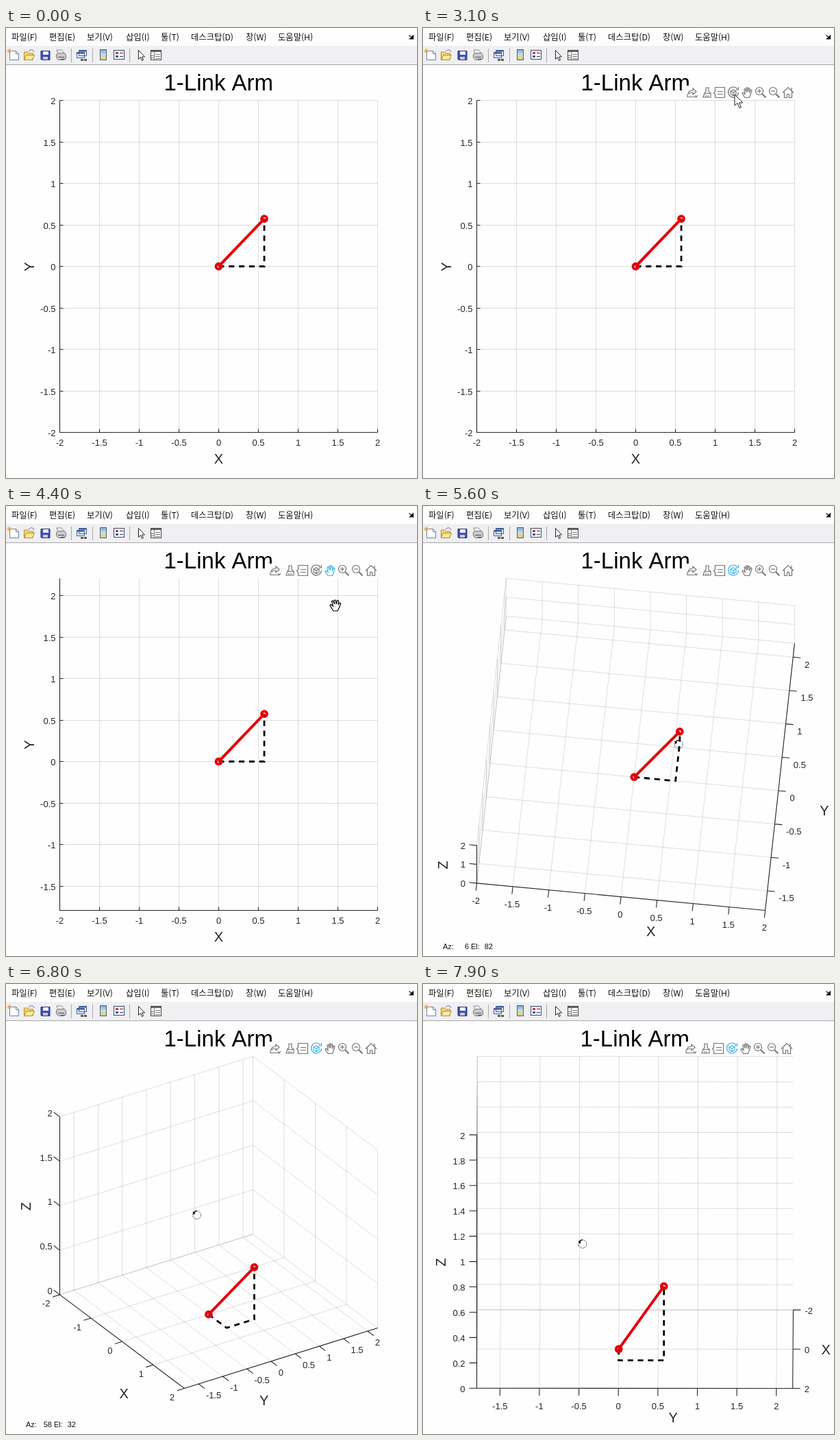
These frames come from a looping animation (600x656 px, 8 s). An HTML page:

```html
<!DOCTYPE html>
<html lang="ko">
<head>
<meta charset="utf-8">
<title>1-Link Arm</title>
<style>
html, body { margin: 0; width: 100%; height: 100%; overflow: hidden; background: #fff; }
svg { display: block; }
text { font-family: "Liberation Sans", Arial, sans-serif; font-kerning: none; }
.menu text { font: 12.3px "Noto Sans CJK KR", "Noto Sans CJK", sans-serif; fill: #111; }
.num { font-size: 13px; fill: #262626; }
.name { font-size: 20px; fill: #262626; text-anchor: middle; }
.info { font-size: 11px; fill: #111; }
.line { fill: none; stroke-linecap: butt; }
</style>
</head>
<body>
<svg width="600" height="656" viewBox="0 0 600 656">
  <rect width="600" height="656" fill="#fefefe"/>
  <g class="menu" id="menu"></g>
  <rect y="26" width="600" height="28" fill="#f0eff1"/>
  <path d="M0 53.5H600" stroke="#a6a6a8"/>
  <path d="M588.5 10.500l5 4.500M594.500 11v5h-5z" stroke="#111" stroke-width="1.200" fill="#111"/>
  <g stroke-width="1" fill="none">
    <path d="M95.500 30V50M126.500 30V50M180.500 30V50" stroke="#a8a8ac"/>
    <path d="M5.500 33.500h9l4 4v9h-13z" fill="#fff" stroke="#6b83aa"/>
    <path d="M14.500 33.500v4h4" stroke="#6b83aa"/>
    <path d="M5 30v7M1.500 33.500h7M2.500 31l5 5M7.500 31l-5 5" stroke="#e8922e"/>
    <path d="M26.500 46V35h5l2 2h6v9z" fill="#f7d774" stroke="#b58a24"/>
    <path d="M26.500 46.500l3-7h12l-3 7z" fill="#ffe79a" stroke="#b58a24"/>
    <path d="M33 34q4-4 7-1l1 2" stroke="#5a77a8"/>
    <path d="M51 33.500h13v13h-12l-1-1z" fill="#3d4fb5" stroke="#26327f"/>
    <path d="M54 34h8v5h-8z" fill="#eef1ff"/>
    <path d="M54 42h7v4h-7z" fill="#c8cada"/>
    <path d="M76 38l-2-6h7l5 6" fill="#fff" stroke="#888"/>
    <path d="M73.500 38.500l3-2h9l2 3v5l-3 2h-8l-3-3z" fill="#c9c9ce" stroke="#77777c"/>
    <path d="M76 42.500h9M80 45.500h6" stroke="#55555a"/>
    <path d="M106.500 32.500h11v8h-11zM103.500 35.500h11v8h-11z" fill="#e9efff" stroke="#3c5a98"/>
    <path d="M104 36.500h10M107 33.500h10" stroke="#3c5a98" stroke-width="2"/>
    <path d="M109 46.500h4m1 0h4" stroke="#444" stroke-width="2.500"/>
    <rect x="137.500" y="31.500" width="9" height="15" fill="url(#heat)" stroke="#4a5d84"/>
    <rect x="157.500" y="32.500" width="15" height="13" fill="#fff" stroke="#34466e"/>
    <path d="M160 36.500h4" stroke="#d33" stroke-width="3"/>
    <path d="M160 41.500h4" stroke="#35c" stroke-width="3"/>
    <path d="M166 36.500h5M166 41.500h5" stroke="#333"/>
    <path d="M193.500 32.500v13l3-3 2 5 2-1-2-4.500h4z" fill="#fff" stroke="#222"/>
    <rect x="211.500" y="32.500" width="15" height="14" fill="#fff" stroke="#444"/>
    <path d="M212 34h14" stroke="#666" stroke-width="2"/>
    <path d="M212 40.500h4M212 43.500h4M218 38.500h7M218 41.500h7M218 44.500h7M216.500 35v11" stroke="#777"/>
  </g>
  <defs>
    <linearGradient id="heat" x2="0" y2="1">
      <stop stop-color="#7aa7e8"/><stop offset=".5" stop-color="#c6e3cf"/><stop offset="1" stop-color="#f2c86a"/>
    </linearGradient>
  </defs>
  <text id="title" y="91" font-size="33" fill="#000">1-Link Arm</text>
  <path id="grid" class="line" stroke="#262626" stroke-opacity=".15"/>
  <path id="axes" class="line" stroke="#262626" stroke-width="1.100"/>
  <g id="labels"></g>
  <path id="dash" class="line" stroke="#000" stroke-width="2.800" stroke-dasharray="8 6.800"/>
  <path id="arm" class="line" stroke="#e3000b" stroke-width="4"/>
  <g id="joints" fill="none" stroke="#e3000b" stroke-width="4"><circle r="3.900"/><circle r="3.900"/></g>
  <g id="tools" fill="none" stroke="#747474" stroke-width="1.200">
    <rect x="385" y="84" width="158" height="20" fill="#fefefe" stroke="none"/>
    <path d="M386 96.500v4h14M387 96q1-5 7-5v-3l5 4.500-5 4.500v-3q-4 0-7 2zM397 98l2 2.500 2-2.500"/>
    <path d="M413 87h4v6l3 2v6h-11l2-6 2-2zM411 95.500h9M413 98v3M416 98v3"/>
    <path d="M426.500 86.500h14v15h-14v-5l-2-2 2-2zM430 92.500h8M430 96.500h8"/>
    <g id="spin"><path d="M459 89a7.500 7.500 0 1 0 1.500 5M460.500 86v4h-4"/><path d="M453 90l4 2v4.500l-4 2-4-2v-4.500zM449 92l4 2 4-2M453 94v4.500"/></g>
    <g id="hand"><path d="M470 101.500l-4-6q0-2 2-1l2 2-1-7q1-2 2 0l1 4v-6q1-2 2 0v6l1-5q1-2 2 0l-.5 6 1.500-4q2-1 2 1l-2 6-1.500 4z"/></g>
    <g id="lens"><circle cx="491" cy="92" r="5.500"/><path d="M495 96l5.500 5.500" stroke-width="2"/><path d="M488 92h6"/></g>
    <path d="M491 89v6"/>
    <use href="#lens" x="20"/>
    <path d="M525 94.500l8-8 8 8M527.500 93v8.500h4v-5h3v5h4V93M538 91v-4"/>
  </g>
  <g id="info" class="info"><text x="29" y="646">Az:</text><text x="67" y="646" text-anchor="end"></text><text x="70" y="646">El:</text><text x="102" y="646" text-anchor="end"></text></g>
  <g id="cursors">
    <path d="M0 0v16l4-3.500 3 7 2.500-1-3-6.500h5.500z" fill="#fff" stroke="#222"/>
    <path d="M-3 8l-5-8q0-2 2-1l2.500 2-2-7q1-2 2.500 0l1.500 4-.5-5q1-2 2.500 0l.5 5 1.500-5q1-1.500 2 0l-.5 6 2-3q2 0 1.500 2l-2.500 6-2 4z" fill="#fff" stroke="#000" stroke-width="1.200"/>
    <g fill="none" stroke="#111"><circle r="6" stroke-dasharray="1.300 1.300"/><path d="M-5-2a6 6 0 0 1 5-4" stroke-width="1.500"/><path d="M-6-5l1 5 3-3z" fill="#111" stroke="none"/></g>
  </g>
</svg>
<script>
const LOOP = 8000, LEFT = 78.5, TOP = 105.5, HEIGHT = 484;
const SHOW_TOOLS = 1700, PAN_ON = 3300, SPIN_ON = 4700, DRAG = 5500, RELEASE = 7800;
const REACH = 0.5736, RISE = 0.585;
const CURSOR = [[2000, 568, 190], [2400, 480, 124], [2600, 445, 96], [2900, 445, 96], [3000, 455, 97],
  [3100, 455, 97], [3300, 472, 94], [3600, 481, 120], [4200, 481, 145], [4450, 481, 145], [4700, 453, 95],
  [4800, 453, 95], [5300, 384, 362], [5500, 384, 362], [6100, 320, 275], [7300, 249, 381], [7900, 233, 379]];
const VIEW = [[DRAG, 0, 90], [6100, 34.9, 42], [7300, 73.1, 25], [RELEASE, 90.1, 17.2]];
const PAN = [[3600, 0], [4200, 25]];
const MENU = [[8, '파일(F)'], [63, '편집(E)'], [118, '보기(V)'], [175, '삽입(I)'], [226, '툴(T)'],
  [270, '데스크탑(D)'], [350, '창(W)'], [397, '도움말(H)']];

const $ = id => document.getElementById(id);
const show = (el, on) => { el.style.display = on ? '' : 'none'; };
const rad = deg => deg * Math.PI / 180;
const fix = n => n.toFixed(2);
const seg = (a, b) => `M${fix(a[0])} ${fix(a[1])}L${fix(b[0])} ${fix(b[1])}`;
const poly = pts => 'M' + pts.map(p => `${fix(p[0])} ${fix(p[1])}`).join('L');
const text = (s, x, y, anchor) =>
  `<text class="num" x="${fix(x)}" y="${fix(y)}" text-anchor="${anchor}">${s}</text>`;
const label = (s, x, y) => `<text class="name" x="${fix(x)}" y="${fix(y + 7)}">${s}</text>`;
const upright = (s, x, y) =>
  `<text class="name" transform="translate(${fix(x + 7)} ${fix(y)}) rotate(-90)">${s}</text>`;

$('menu').innerHTML = MENU.map(([x, s]) => `<text x="${x}" y="18">${s}</text>`).join('');

function track(keys, t) {
  if (t <= keys[0][0]) return keys[0].slice(1);
  for (let i = 1; i < keys.length; i++) {
    const a = keys[i - 1], b = keys[i];
    if (t < b[0]) return a.slice(1).map((v, k) => v + (b[k + 1] - v) * (t - a[0]) / (b[0] - a[0]));
  }
  return keys[keys.length - 1].slice(1);
}

function ticks([lo, hi], step) {
  const out = [];
  for (let i = Math.ceil(lo / step - 1e-6); i * step <= hi + 1e-6; i++) out.push(+(i * step).toFixed(1) || 0);
  return out;
}

// Orthographic view of the unit cube, stretched to fill the plot area.
function projector(az, el, width) {
  const c = Math.cos(rad(az)), s = Math.sin(rad(az)), se = Math.sin(rad(el)), ce = Math.cos(rad(el));
  const sx = width / (Math.abs(c) + Math.abs(s));
  const sy = HEIGHT / (Math.abs(s * se) + Math.abs(c * se) + Math.abs(ce));
  return (u, v, w) => {
    u -= 0.5; v -= 0.5; w -= 0.5;
    return [LEFT + width / 2 + sx * (u * c + v * s),
      TOP + HEIGHT / 2 - sy * (-u * s * se + v * c * se + w * ce)];
  };
}

function flatPlot(yLim) {
  let grid = '', axes = `M${LEFT} ${TOP}V589.5H542.5`, labels = label('X', 310.5, 628) + upright('Y', 34, 348);
  for (const v of ticks([-2, 2], 0.5)) {
    const x = LEFT + (v + 2) * 116;
    grid += `M${x} ${TOP}V589.5`;
    axes += `M${x} 589.5v-5`;
    labels += text(v, x, 609, 'middle');
  }
  for (const v of ticks(yLim, 0.5)) {
    const y = Math.floor(589.5 - (v - yLim[0]) * 121) + 0.5;
    grid += `M${LEFT} ${y}H542.5`;
    axes += `M${LEFT} ${y}h5`;
    labels += text(v, 72.5, y + 5.5, 'end');
  }
  return [grid, axes, labels];
}

function solidPlot(P, yLim, flip) {
  const lims = [[-2, 2], yLim, [0, 2]], back = flip ? 0 : 1;
  // For each axis: the fixed corner and the direction of its ticks.
  const spec = [
    { at: [0, flip ? 1 : 0, 0], out: [0, flip ? 1 : -1, 0] },
    { at: [1, 0, 0], out: [1, 0, 0] },
    { at: [flip ? 1 : 0, 0, 0], out: flip ? [0, -1, 0] : [-1, 0, 0] }
  ];
  let grid = '', axes = '', labels = '';
  spec.forEach(({ at, out }, k) => {
    const on = f => at.map((c, i) => i === k ? f : c);
    const a = P(...on(0)), b = P(...on(1)), len = Math.hypot(b[0] - a[0], b[1] - a[1]);
    const end = P(...at.map((c, i) => (i === k ? 0 : c) + out[i]));
    const dl = Math.hypot(end[0] - a[0], end[1] - a[1]) || 1;
    const dx = (end[0] - a[0]) / dl, dy = (end[1] - a[1]) / dl;
    const step = k === 0 ? (len < 140 ? 2 : len < 380 ? 1 : 0.5)
      : k === 1 ? (len < 140 ? 1 : 0.5)
      : len < 50 ? 2 : len < 100 ? 1 : len < 330 ? 0.5 : 0.2;
    axes += seg(a, b);
    const level = dy < 0.05;
    const gap = 2 + 4 * Math.abs(dx) ** 20;
    const side = dx < -0.2 ? -1 : dx > 0.2 ? 1 : 0;
    for (const v of ticks(lims[k], step)) {
      const f = (v - lims[k][0]) / (lims[k][1] - lims[k][0]);
      const p = P(...on(f)), q = [p[0] + dx * 11, p[1] + dy * 11];
      axes += seg(p, q);
      const drop = k === 2 || level ? 1 : 9.5 + 5 * dy ** 6;
      labels += text(v, q[0] + side * gap, q[1] + drop + 4.7, ['end', 'middle', 'start'][side + 1]);
      if (k === 0) grid += seg(P(f, 0, 0), P(f, 1, 0)) + seg(P(f, back, 0), P(f, back, 1));
      if (k === 1) grid += seg(P(0, f, 0), P(1, f, 0)) + seg(P(0, f, 0), P(0, f, 1));
      if (k === 2) grid += seg(P(0, 0, f), P(0, 1, f)) + seg(P(0, back, f), P(1, back, f));
    }
    const mx = (a[0] + b[0]) / 2, my = (a[1] + b[1]) / 2;
    if (k === 2) labels += upright('Z', flip ? 26 : 29, my + 1);
    else if (level) labels += label('XY'[k], mx + 48 * dx, my + 1);
    else {
      // Names sit outside the axis, shifted toward the nearest corner.
      let tx = (b[0] - a[0]) / len, ty = (b[1] - a[1]) / len;
      if (k === 1 && !flip) { tx = -tx; ty = -ty; }
      let nx = -ty, ny = tx;
      if (ny < 0) { nx = -nx; ny = -ny; }
      const d = 43 + 27 * Math.abs(nx), slide = flip ? 56 : k ? 42 : 48;
      labels += label('XY'[k], mx + nx * d + tx * slide, my + ny * d + ty * slide);
    }
  });
  return [grid, axes, labels];
}

function draw(t) {
  const [az, el] = track(VIEW, t), [pan] = track(PAN, t), [cx, cy] = track(CURSOR, t);
  const solid = t > DRAG, flip = az > 90, shift = flip ? -2 : 0;
  const yLim = [-2 + pan / 121, 2 + pan / 121];
  const P = projector(az, el, 464 + shift);
  const [grid, axes, labels] = solid ? solidPlot(P, yLim, flip) : flatPlot(yLim);
  $('grid').setAttribute('d', grid);
  $('axes').setAttribute('d', axes);
  $('labels').innerHTML = labels;

  const at = (x, y, z) => P((x + 2) / 4, (y - yLim[0]) / 4, z / 2);
  const base = at(0, 0, 0), tip = at(REACH, REACH, RISE);
  $('dash').setAttribute('d', poly([base, at(REACH, 0, 0), at(REACH, REACH, 0), tip]));
  $('arm').setAttribute('d', seg(base, tip));
  [base, tip].forEach((p, i) => {
    const c = $('joints').children[i];
    c.setAttribute('cx', fix(p[0]));
    c.setAttribute('cy', fix(p[1]));
  });

  $('title').setAttribute('x', 230.5 + shift / 2);
  show($('tools'), t >= SHOW_TOOLS);
  $('tools').setAttribute('transform', `translate(${shift} 0)`);
  $('hand').setAttribute('stroke', t >= PAN_ON && t < SPIN_ON ? '#3db2ea' : '#747474');
  $('spin').setAttribute('stroke', t >= SPIN_ON ? '#3db2ea' : '#747474');

  const info = $('info');
  show(info, solid && t < RELEASE);
  info.children[1].textContent = Math.ceil(az);
  info.children[3].textContent = Math.round(el);

  const kind = t < 2000 ? -1 : t < 3500 ? 0 : t < 4550 ? 1 : t < 4900 ? 0 : 2;
  $('cursors').setAttribute('transform', `translate(${fix(cx)} ${fix(cy)})`);
  [...$('cursors').children].forEach((c, i) => show(c, i === kind));
}

const start = performance.now();
function tick() {
  const t = (performance.now() - start) % LOOP;
  draw(Math.floor(t / 100) * 100);
  requestAnimationFrame(tick);
}
tick();
</script>
</body>
</html>
```
